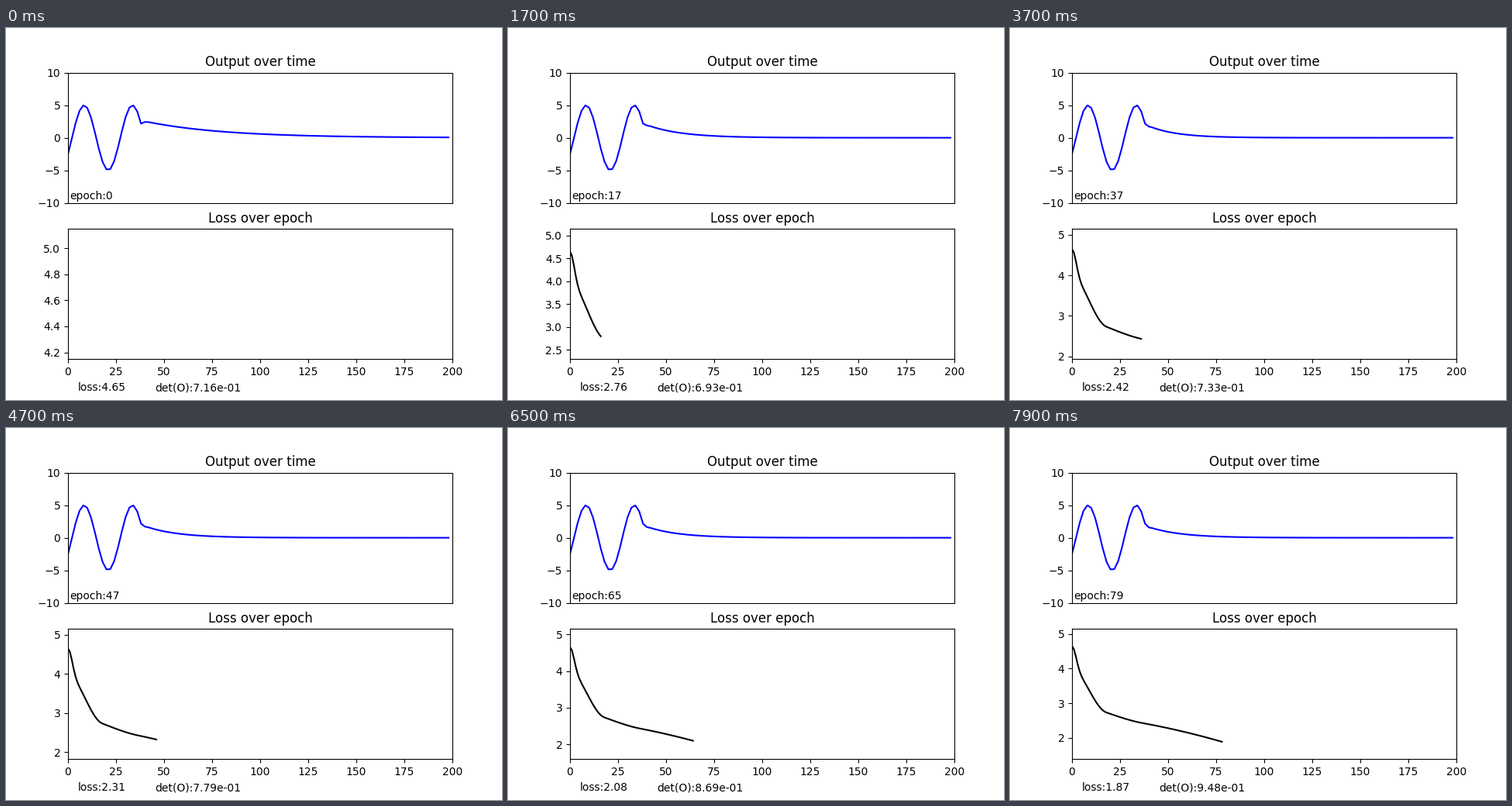
A matplotlib script for the animation above (8 s loop, 640 by 480 pixels).

```python
import numpy as np
import matplotlib.pyplot as plt
from matplotlib.animation import FuncAnimation

EPOCHS = 80
DRIVEN = 20  # samples before the output runs free


def ramp(e, end):
    """Cosine ease from 1 at epoch 0 down to 0 at `end`."""
    return (1 + np.cos(np.pi * np.minimum(e / end, 1))) / 2


epochs = np.arange(EPOCHS)

# Slow improvement plus three early drops
loss = (2.705 - 0.005 * epochs - 7.05e-5 * epochs ** 2
        + 0.265 * ramp(epochs, 37) + 0.973 * ramp(epochs, 18)
        + 0.7055 * np.exp(-(epochs / 3) ** 2))
det = np.interp(epochs, [0, 10, 25, 37, 57, 72, 79],
                [.716, .673, .716, .733, .826, .906, .948])

# The free-running decay rate swings around its final value and settles
swing = 0.119 * np.exp(-epochs / 14.3) * np.cos(2 * np.pi * (epochs - 8.95) / 30)
decay = 0.06 + swing
level = 1.97 - 0.0041 * epochs - 4 * swing + 0.41 * np.exp(-epochs / 8)

t = np.arange(0, 200, 2)
wave = 5 * np.sin(t[:DRIVEN] / 4 - np.pi / 6)


def output(e):
    tail = level[e] * np.exp(-decay[e] * (t[DRIVEN:] - t[DRIVEN]))
    tail[0] *= 0.96
    return np.concatenate([wave, tail])


fig, (top, low) = plt.subplots(2, 1, figsize=(6.4, 4.8), dpi=100)
top.set(title="Output over time", xlim=(0, 200), ylim=(-10, 10))
top.tick_params(bottom=False, labelbottom=False)
low.set(title="Loss over epoch", xlim=(0, 200))

out_line, = top.plot([], [], "b")
loss_line, = low.plot([], [], "k")
epoch_text = top.text(1, -9.5, "")
loss_text = fig.text(0.145, 0.025, "")
det_text = fig.text(0.3, 0.025, "")


def update(e):
    out_line.set_data(t, output(e))
    loss_line.set_data(epochs[:e], loss[:e])
    low.set_ylim(loss[max(e - 1, 0)] - 0.5, loss[0] + 0.5)
    epoch_text.set_text(f"epoch:{e}")
    loss_text.set_text(f"loss:{loss[e]:.2f}")
    det_text.set_text(f"det(O):{det[e]:.2e}")
    return out_line, loss_line, epoch_text, loss_text, det_text


anim = FuncAnimation(fig, update, frames=EPOCHS, interval=100,
                     repeat=True, repeat_delay=0, blit=False)
plt.show()
```
